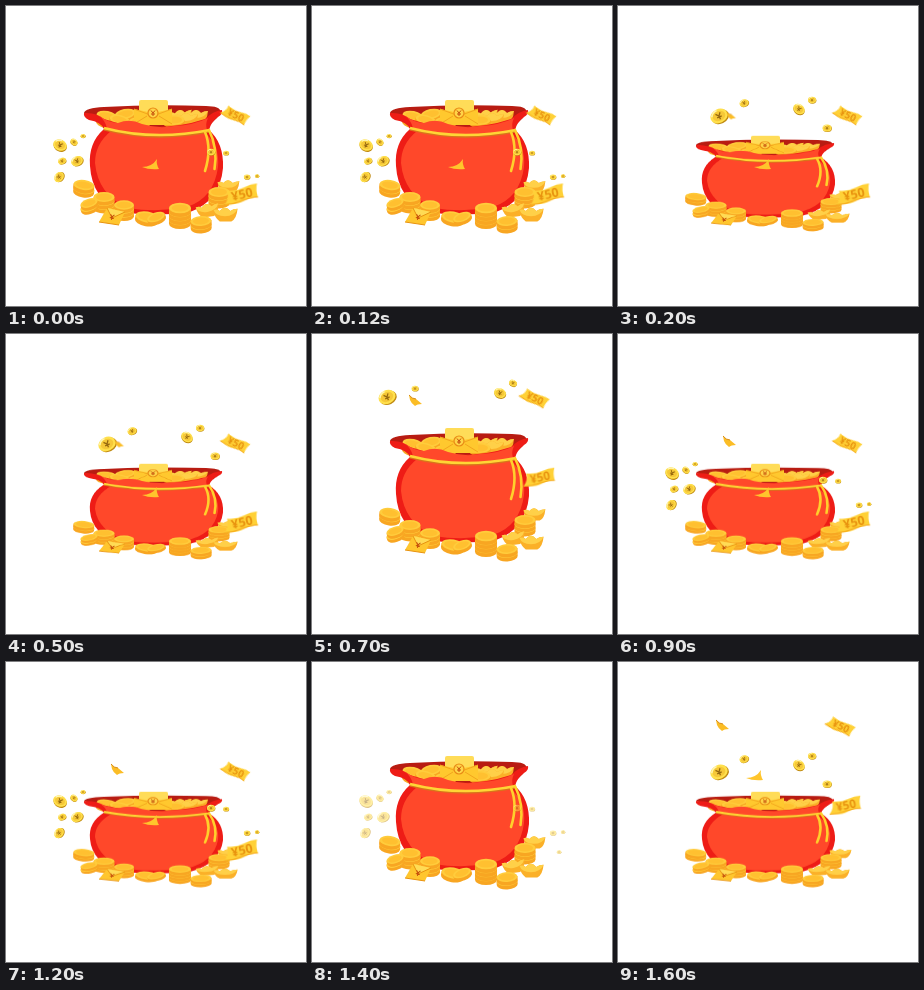
An HTML page for the animation above (1.8 s loop, 300 by 300 pixels).

```html
<!DOCTYPE html>
<html lang="en">
<head>
<meta charset="utf-8">
<title>Money bag</title>
<style>
html, body { margin: 0; width: 100%; height: 100%; overflow: hidden; background: #fff; }
svg { display: block; width: 100vw; height: 100vh; }
text { font: 700 12px "Noto Sans", "DejaVu Sans", sans-serif; fill: #e8930f; text-anchor: middle; }
.step { animation: step 1800ms step-end infinite; }
/* Six held poses; a missing pose is hidden */
@keyframes step {
  0%, 100% { transform: var(--p0, scale(0)); }
  11.111% { transform: var(--p1, scale(0)); }
  38.889% { transform: var(--p2, scale(0)); }
  50% { transform: var(--p3, scale(0)); }
  77.778% { transform: var(--p4, scale(0)); }
  88.889% { transform: var(--p5, scale(0)); }
}
#bag {
  --tall: none;
  --flat: matrix(1, 0, 0, .715, 0, 62.6);
  --p0: var(--tall); --p2: var(--tall); --p4: var(--tall);
  --p1: var(--flat); --p3: var(--flat); --p5: var(--flat);
}
</style>
</head>
<body>
<svg viewBox="0 0 300 300">
  <defs>
    <g id="coin">
      <ellipse cx=".8" cy="1.2" rx="9" ry="7" fill="#c08a12"/>
      <ellipse rx="9" ry="7" fill="#ffe04c"/>
      <ellipse rx="6.6" ry="4.9" fill="#f6c838"/>
      <path d="M-2.5-3 0 0 2.5-3M0 0V3.5M-2.5 1H2.5" fill="none" stroke="#96690f" stroke-width="1.3"/>
      <path d="M-7-2Q-5-6 0-6" fill="none" stroke="#fff6b8" stroke-width="1.5"/>
    </g>
    <g id="disc">
      <path d="M-10.5 0V3.5A10.5 5 0 0 0 10.5 3.5V0Z" fill="#f8a622"/>
      <ellipse rx="10.5" ry="5" fill="#ffcc3c"/>
      <ellipse rx="8" ry="3.4" fill="#ffc030"/>
    </g>
    <g id="ingot">
      <path d="M-11-3Q-7-4-5-2Q0-8 5-2Q8-4 12-4Q11 6 6 8H-5Q-10 5-11-3Z" fill="#fbb028"/>
      <path d="M-11-3Q-7-4-5-2Q0-8 5-2Q8-4 12-4Q9 3 0 3T-11-3Z" fill="#ffd048"/>
    </g>
    <g id="note">
      <path d="M-14-4Q-5-3 2-6T15-9Q13-3 15 4Q7 4 1 7T-17 9Q-12 3-14-4Z" fill="#ffd137"/>
      <path d="M-17 9Q-8 9 1 6T15 4" fill="none" stroke="#f5a81c"/>
      <text y="4.5" transform="rotate(-10)">¥50</text>
    </g>
    <path id="yen" d="M-2-2.5 0 0 2-2.5M0 0V3M-2 1H2" fill="none" stroke="#c44c0c"/>
    <path id="scrap" d="M-9 3Q1 3 6-5Q5 0 8 5Q-2 6-9 3Z" fill="#ffc52c"/>
    <g id="bits">
      <path d="M-6-6Q-3-2 1-2L7 3Q2 3 0 5Q-4 2-5-1Z" fill="#fbbd26"/>
      <path d="M-6-6Q-3-2 1-2" fill="none" stroke="#d78a10"/>
    </g>
  </defs>

  <g id="bag" class="step">
    <path d="M78 107Q79 102 98 101Q147 98 200 100Q214 100 215 106Q207 120 192 124H102Q91 110 78 107Z" fill="#b81c12"/>
    <g id="fill"></g>
    <g id="envelope">
      <path d="M133 96Q133 94 135 94H160Q162 94 162 96V110H133Z" fill="#ffdc58"/>
      <path d="M128 103 147 107 166 103V119H128Z" fill="#ffc82e"/>
      <path d="M128 103 147 110 166 103M128 118 141 110M166 118 153 110" fill="none" stroke="#f2a51d"/>
      <circle cx="147" cy="107" r="5" fill="#ffd447" stroke="#e98b16" stroke-width="1.2"/>
      <use href="#yen" x="147" y="107"/>
    </g>
    <path d="M78 107Q77 111 83 114Q95 116 98 123Q82 137 84 160Q86 193 115 206Q150 211 184 206Q214 195 217 162Q218 137 203 124Q205 116 212 111Q217 108 216 104Q207 105 199 113Q175 121 148 121T98 113Q90 106 78 107Z" fill="#ee1c16"/>
    <path d="M92 109Q101 116 112 117Q124 112 136 118Q152 123 168 120Q188 119 202 112Q199 118 201 124Q150 134 101 122Q99 114 92 109Z" fill="#ff482a"/>
    <path d="M105 125Q150 135 198 126Q214 139 212 161Q208 192 181 201Q151 207 122 202Q92 189 89 157Q89 138 105 125Z" fill="#ff482a"/>
    <path d="M98 123Q148 136 204 125" fill="none" stroke="#d9741a" stroke-width="3.2"/>
    <path d="M98 122Q148 135 204 124" fill="none" stroke="#ffd535" stroke-width="2.6"/>
    <path d="M199 126Q206 143 199 165M203 124Q212 142 208.500 163" fill="none" stroke="#ffd02c" stroke-width="2.6" stroke-linecap="round"/>
    <g id="pile"></g>
    <g transform="translate(107 210)">
      <path d="M-6-8 12-4 6 9-14 6Z" fill="#ffc62e"/>
      <path d="M-6-8 12-4-1 2Z" fill="#ffdb55"/>
      <path d="M-6-8-1 2 12-4M-14 6 6 9" fill="none" stroke="#e8920f"/>
      <use href="#yen" transform="translate(-1 1) rotate(12)"/>
    </g>
  </g>
  <g id="loose"></g>
</svg>
<script>
const $ = id => document.getElementById(id);
const use = (id, x, y, sx = 1, sy = sx, turn = 0) =>
  `<use href="#${id}" transform="translate(${x} ${y}) rotate(${turn}) scale(${sx} ${sy})"/>`;
const coin = (x, y, s, turn = 0) => use("coin", x, y, s, s, turn);
const stack = (x, y, n, s = 1, turn = 0) =>
  Array.from({ length: n }, (_, i) => use("disc", x, y + (n - 1 - i) * 4, s, s, turn)).join("");

// poses: { pose number: CSS transform }
const step = (poses, art, opacity = 1) => {
  const vars = Object.entries(poses).map(([i, t]) => `--p${i}:${t}`).join(";");
  return `<g class="step" style="${vars}"><g opacity="${opacity}">${art}</g></g>`;
};
const still = (poses, art, opacity) =>
  step(Object.fromEntries(poses.map(i => [i, "none"])), art, opacity);
const at = (x, y, turn = 0, s = 1) =>
  `translate(${x}px,${y}px) rotate(${turn}deg) scale(${s})`;

$("fill").innerHTML =
  stack(101, 110, 2, 1, 12) + stack(119, 108, 2, 1, -12) + stack(114, 114, 1, 1, 15) +
  use("ingot", 174, 109, 1, 1, -6) + use("ingot", 190, 109) +
  use("ingot", 180, 112) + stack(168, 114, 1) + stack(133, 116, 1);

$("pile").innerHTML =
  stack(78, 179, 2, 1, 8) + stack(98, 191, 3) + stack(83, 197, 2, .85, -18) +
  stack(118, 199, 3, .95) + stack(141, 211, 1, 1.1, 10) + stack(150, 211, 1, .9, -20) +
  use("ingot", 222, 179, .95) + stack(213, 186, 3) + use("ingot", 201, 203, 1, 1, -8) +
  stack(174, 202, 4, 1.05) + stack(195, 215, 2, 1, -4) + use("ingot", 219, 207, 1.05);

const side = coin(54, 139, .78, 25) + coin(53, 171, .62, -50) + coin(71, 155, .68, -25) +
  coin(56, 155, .45, -20) + coin(68, 136, .42, 40) + coin(77, 130, .28) +
  coin(205, 146, .45) + coin(220, 147, .32) + coin(241, 171, .35) + coin(251, 170, .24);
const low = at(236, 188, -4, 1.05), high = at(228, 143, -2, .98);
const noteNear = at(230, 109, 36, .83), noteFar = at(223, 64, 36, .85);
const lying = at(145, 158);

$("loose").innerHTML =
  still([0, 3], side) +
  still([4], side + coin(247, 190, .25), .5) +
  still([1, 5], coin(101, 110, 1, -25) + coin(126, 97, .52, -20) + coin(181, 103, .68, 35) +
    coin(194, 94, .45) + coin(209, 122, .5)) +
  still([1], use("bits", 113, 110, .7)) +
  still([2], coin(75, 63, .98, -25) + coin(103, 54.5, .38) + coin(188, 59, .68, 20) +
    coin(201, 49, .45, 25)) +
  step({ 0: noteNear, 1: noteNear, 2: noteFar, 3: noteNear, 5: noteFar }, use("note", 0, 0)) +
  step({ 0: low, 1: low, 2: high, 3: low, 5: high }, use("note", 0, 0)) +
  step({ 0: lying, 1: lying, 3: lying, 5: at(137, 113) }, use("scrap", 0, 0)) +
  step({ 2: at(103, 67), 3: at(111, 108), 5: at(104, 64) }, use("bits", 0, 0));
</script>
</body>
</html>
```
